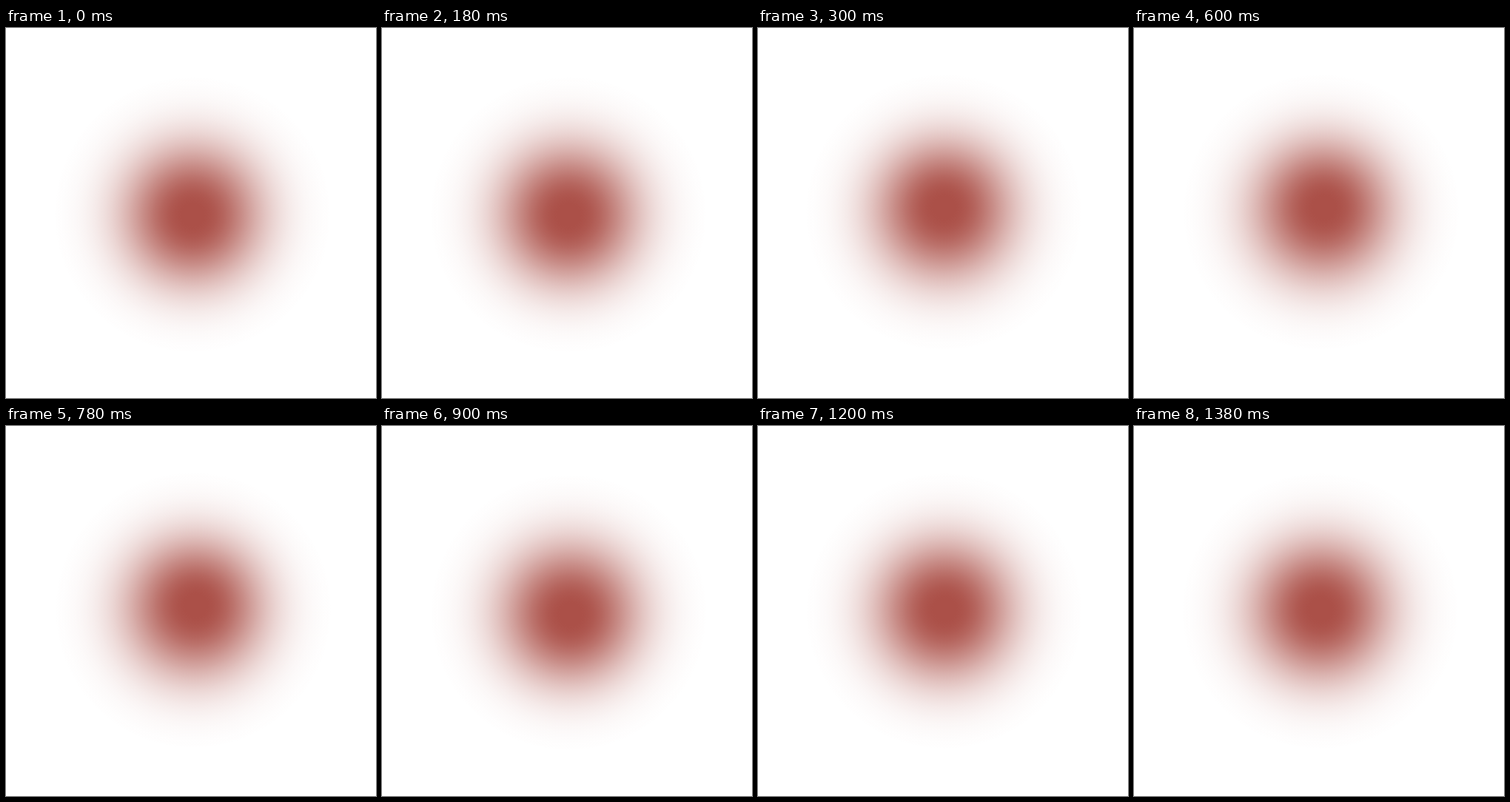
An HTML page with a canvas for the animation above (1500 ms loop, 500 px wide and 500 px high).

```html
<!DOCTYPE html>
<html lang="en">
<head>
<meta charset="utf-8">
<title>Flickering glow</title>
<style>
html, body { margin: 0; width: 100%; height: 100%; overflow: hidden; background: #fff; }
canvas { display: block; }
</style>
</head>
<body>
<canvas id="stage" width="500" height="500"></canvas>
<script>
const ctx = document.getElementById('stage').getContext('2d');
const STEP = 300;
const RADIUS = 190;
const PLATEAU = 12;
const SPREAD = 59;
const STOPS = 64;

// Hot core and outer rim centre for each pose
const poses = [
  { core: [252, 253], rim: [252, 252] },
  { core: [251, 242], rim: [251, 249] },
  { core: [257, 242], rim: [253, 249] },
  { core: [255, 255], rim: [252.5, 252] },
  { core: [252, 248], rim: [251.5, 250] }
];

// Small solid core, then a Gaussian tail lowered to reach zero at the rim
const bell = r => Math.exp(-0.5 * (Math.max(0, r - PLATEAU) / SPREAD) ** 2);
const floor = bell(RADIUS);
const alpha = r => (bell(r) - floor) / (1 - floor);

function drawGlow({ core, rim }) {
  const glow = ctx.createRadialGradient(...core, 0, ...rim, RADIUS);
  for (let i = 0; i <= STOPS; i++) {
    const t = i / STOPS;
    glow.addColorStop(t, `rgba(171, 80, 72, ${alpha(t * RADIUS).toFixed(4)})`);
  }
  ctx.fillStyle = '#fff';
  ctx.fillRect(0, 0, 500, 500);
  ctx.fillStyle = glow;
  ctx.fillRect(0, 0, 500, 500);
}

const start = performance.now();

function tick(now) {
  const time = Math.max(0, now - start);
  drawGlow(poses[Math.floor(time / STEP) % poses.length]);
  requestAnimationFrame(tick);
}

tick(start);
</script>
</body>
</html>
```
